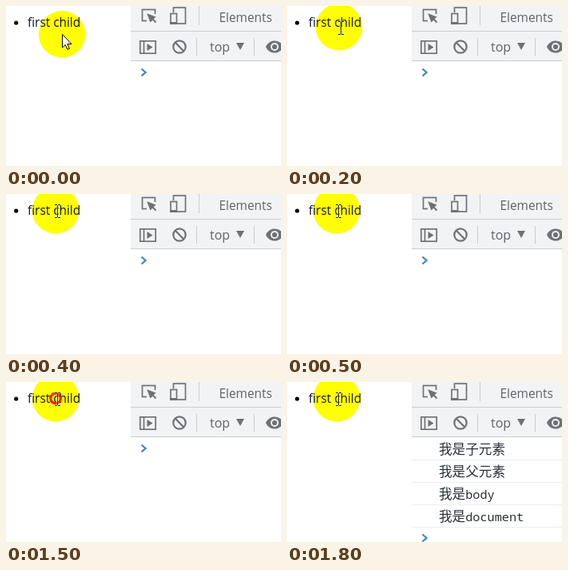
Recreate the animation shown at these times as an HTML page with a canvas. Size 344 by 200 pixels, loop 3 s.

```html
<!DOCTYPE html>
<html lang="zh">
<head>
<meta charset="utf-8">
<style>
html, body { margin: 0; width: 100%; height: 100%; overflow: hidden; background: #fff; }
canvas { display: block; width: 344px; height: 200px; }
</style>
</head>
<body>
<canvas id="stage"></canvas>
<script>
const W = 344, H = 200, LOOP = 3000, STEP = 100;
const MOVE_STEPS = 4, CLICK = 15, LOGGED = 17, ROW = 28;
const canvas = document.getElementById('stage');
const dpr = window.devicePixelRatio || 1;
canvas.width = W * dpr;
canvas.height = H * dpr;
const c = canvas.getContext('2d');
c.scale(dpr, dpr);

const SANS = '"Open Sans", "Noto Sans", sans-serif';
const MONO = '"Noto Sans Mono", "DejaVu Sans Mono", monospace';
const CJK = '"Noto Sans CJK SC", "Noto Sans CJK", sans-serif';
const GREY = '#6e7276', BAR = '#f1f3f4', RULE = '#cacdd1', INK = '#2a3038';
const logs = ['子元素', '父元素', 'body', 'document'];

function rect(x, y, w, h, color) {
  c.fillStyle = color;
  c.fillRect(x, y, w, h);
}

function box(x, y, w, h, width = 1.7) {
  c.strokeStyle = GREY;
  c.lineWidth = width;
  c.strokeRect(x, y, w, h);
}

function disc(x, y, r, color) {
  c.fillStyle = color;
  c.beginPath();
  c.arc(x, y, r, 0, Math.PI * 2);
  c.fill();
}

function ring(x, y, r, width, color) {
  c.strokeStyle = color;
  c.lineWidth = width;
  c.beginPath();
  c.arc(x, y, r, 0, Math.PI * 2);
  c.stroke();
}

function line(x1, y1, x2, y2, width = 1.7) {
  c.strokeStyle = GREY;
  c.lineWidth = width;
  c.beginPath();
  c.moveTo(x1, y1);
  c.lineTo(x2, y2);
  c.stroke();
}

// Isosceles triangle pointing along the given angle
function triangle(x, y, length, half, angle) {
  c.save();
  c.translate(x, y);
  c.rotate(angle);
  c.fillStyle = GREY;
  c.beginPath();
  c.moveTo(length, 0);
  c.lineTo(0, -half);
  c.lineTo(0, half);
  c.fill();
  c.restore();
}

function text(s, x, y, font, color) {
  c.font = font;
  c.fillStyle = color;
  c.fillText(s, x, y);
}

function inspectIcon() {
  box(170.5, 4.5, 16, 14);
  rect(176, 10, 13, 11, BAR);
  triangle(184, 17, 11, 5, -Math.PI * 0.75);
  line(181, 14, 187.5, 20.5, 2);
}

function deviceIcon() {
  box(209.5, 2, 15, 20);
  rect(204, 8, 10, 16, BAR);
  box(206, 9.5, 7.5, 12.5);
  rect(205, 20, 9, 3, GREY);
}

function sidebarIcon() {
  box(167.8, 43.8, 19.4, 15.4);
  line(172.5, 44, 172.5, 59);
  triangle(176.5, 51.5, 7, 4.5, 0);
}

function banIcon() {
  const d = 7.7 * Math.SQRT1_2;
  ring(217, 51, 7.7, 2.2, GREY);
  line(217 - d, 51 - d, 217 + d, 51 + d, 2.2);
}

function eyeIcon() {
  c.fillStyle = GREY;
  c.beginPath();
  c.moveTo(325, 51);
  c.bezierCurveTo(329, 41, 343, 41, 347, 51);
  c.bezierCurveTo(343, 61, 329, 61, 325, 51);
  c.fill();
  disc(336, 51, 5, BAR);
  disc(336, 51, 3.1, GREY);
}

function toolbar() {
  rect(156, 0, 188, 69, BAR);
  rect(156, 31, 188, 1, RULE);
  rect(156, 68, 188, 1, RULE);
  rect(241, 0, 1, 24, RULE);
  rect(238, 40, 1, 22, RULE);
  rect(310, 40, 1, 22, RULE);
  inspectIcon();
  deviceIcon();
  sidebarIcon();
  banIcon();
  eyeIcon();
  text('Elements', 266.5, 19.5, '15.4px ' + SANS, '#5f6368');
  text('top', 255, 57, '16px ' + SANS, '#5f6368');
  triangle(293, 46, 9, 5, Math.PI / 2);
}

function prompt(y) {
  c.strokeStyle = '#4380d3';
  c.lineWidth = 2.2;
  c.beginPath();
  c.moveTo(169.5, y - 4.5);
  c.lineTo(174.5, y);
  c.lineTo(169.5, y + 4.5);
  c.stroke();
}

function output() {
  logs.forEach((name, i) => {
    const y = 89.5 + i * ROW;
    const font = /[a-z]/.test(name) ? '15.2px ' + MONO : '300 16.6px ' + CJK;
    text('我是', 190, y, '300 16.6px ' + CJK, INK);
    text(name, 223.2, y, font, INK);
    rect(156, 97 + i * ROW, 188, 1, '#ecedf0');
  });
}

function arrow(x, y) {
  c.save();
  c.translate(x, y);
  const p = new Path2D('M0 0V16.5L3.8 13L6.4 18.8L8.8 17.8L6.3 12H11.4Z');
  c.fillStyle = '#fff';
  c.fill(p);
  c.strokeStyle = '#000';
  c.lineWidth = 1;
  c.stroke(p);
  c.restore();
}

function beam(x, y) {
  const bars = (pad, color) => {
    rect(x - pad, y - 7 - pad, 1 + 2 * pad, 15 + 2 * pad, color);
    for (const dx of [-3, 1])
      for (const dy of [-8, 8])
        rect(x + dx - pad, y + dy - pad, 3 + 2 * pad, 1 + 2 * pad, color);
  };
  bars(0.6, 'rgba(255,255,255,0.55)');
  bars(0, '#222');
}

function draw(t) {
  const step = Math.floor(t / STEP);
  const left = Math.max(0, 1 - step / MOVE_STEPS) ** 1.3;
  const x = Math.round(62 + 8 * left);
  const y = Math.round(20 + 15 * left);
  const sinceClick = step - CLICK;
  const logged = step >= LOGGED;

  rect(0, 0, W, H, '#fff');
  disc(x, y + 0.3, 29.2, '#ffff00');
  disc(12.7, 21, 2.6, '#000');
  text('first child', 27, 26, '15.4px ' + SANS, '#14142c');
  if (sinceClick >= 0 && sinceClick < 3) ring(x, y + 0.5, 6.3 + sinceClick * 3, 3.2, '#ee2408');

  toolbar();
  if (logged) output();
  prompt(logged ? 195 : 83);

  if (step < 2) arrow(x + 0.5, y + 0.5);
  else beam(x + 2, y + 1);
}

const start = performance.now();
function tick() {
  draw((performance.now() - start) % LOOP);
  requestAnimationFrame(tick);
}
tick();
</script>
</body>
</html>
```
